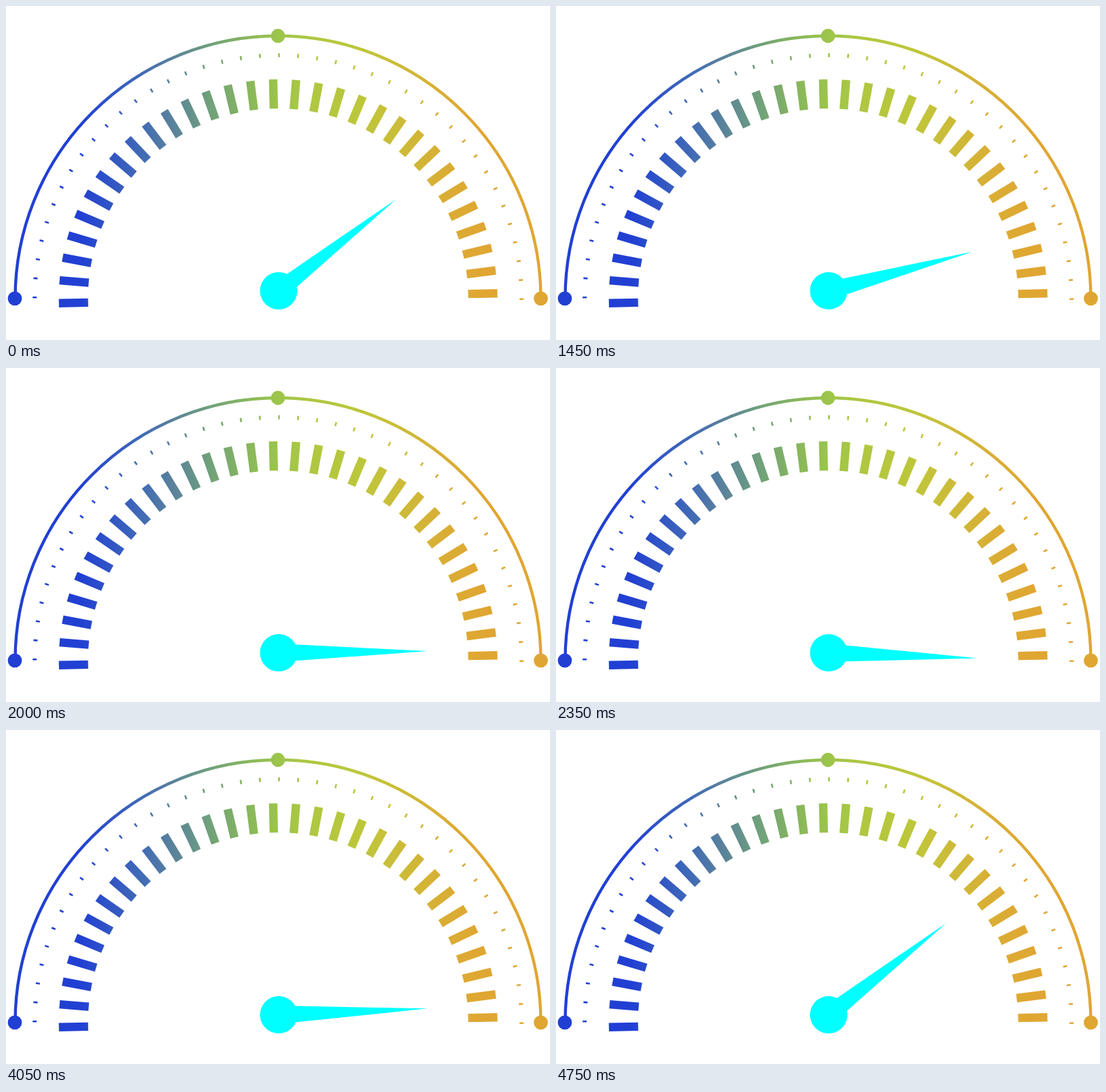
These frames come from a looping animation (800 by 492 pixels, 4800 ms). An HTML page:

```html
<!DOCTYPE html>
<html lang="en">
<head>
<meta charset="utf-8">
<title>Gauge</title>
<style>
  html, body { margin: 0; width: 100%; height: 100%; overflow: hidden; background: #fff; }
  svg { display: block; width: 100%; height: 100%; }
</style>
</head>
<body>
<svg viewBox="0 0 800 492">
  <defs>
    <linearGradient id="scale" gradientUnits="userSpaceOnUse" x1="0" y1="0" x2="800" y2="0"></linearGradient>
  </defs>
  <g id="dial" fill="none" stroke="url(#scale)">
    <path d="M13.5 430.5A386.5 386.5 0 0 1 786.5 430.5" stroke-width="4.4"/>
  </g>
  <g fill="url(#scale)">
    <circle cx="13" cy="430.8" r="10.4"/>
    <circle cx="400" cy="44" r="10.4"/>
    <circle cx="786.5" cy="430.8" r="10.4"/>
  </g>
  <g id="needle" fill="#0ff">
    <circle r="27.5"/>
    <path d="M14 -12.6L219 0L14 12.6Z"/>
  </g>
</svg>
<script>
const LOOP = 4800, STEP = 50;
const CENTER = { x: 400.2, y: 430.5 };

const colors = [
  [110, '#2140d3'], [200, '#416bb5'], [240, '#577f9e'], [300, '#70a17a'],
  [360, '#8ab85a'], [400, '#9cc54b'], [450, '#afc741'], [520, '#bcc73a'],
  [550, '#c5c23a'], [600, '#d0b737'], [640, '#d9ae35'], [700, '#e0a632']
];

// Time since leaving the low position (ms) and needle angle (degrees)
const sweep = [
  [0, -38], [15, -37.8], [50, -35.2], [100, -30.7], [150, -25.7], [200, -20.7],
  [250, -16.3], [300, -12.7], [350, -10], [450, -7.2], [565, -5.2], [650, -3.3],
  [750, -1.5], [850, -0.2], [950, 0.8], [1050, 1.5], [1150, 2], [1165, 2.1]
];

const dial = document.getElementById('dial');
const needle = document.getElementById('needle');

function add(parent, tag, attrs) {
  const node = document.createElementNS('http://www.w3.org/2000/svg', tag);
  for (const key in attrs) node.setAttribute(key, attrs[key]);
  parent.append(node);
}

function addTicks(count, start, gap, inner, outer, width) {
  for (let i = 0; i < count; i++) {
    const a = (180 + start + i * gap) * Math.PI / 180;
    const c = Math.cos(a), s = Math.sin(a);
    add(dial, 'path', {
      d: `M${CENTER.x + inner * c} ${CENTER.y + inner * s}L${CENTER.x + outer * c} ${CENTER.y + outer * s}`,
      'stroke-width': width
    });
  }
}

function angleAt(s) {
  const i = sweep.findIndex(([time]) => time >= s);
  if (i === 0) return sweep[0][1];
  if (i < 0) return sweep[sweep.length - 1][1];
  const [t0, a0] = sweep[i - 1], [t1, a1] = sweep[i];
  return a0 + (a1 - a0) * (s - t0) / (t1 - t0);
}

function draw(now) {
  const t = Math.floor((now % LOOP) / STEP) * STEP;
  const s = t < 3000 ? t - 1185 : 4750 - t;
  needle.setAttribute('transform', `translate(401 419.5) rotate(${angleAt(Math.max(0, s))})`);
}

for (const [x, color] of colors) {
  add(document.getElementById('scale'), 'stop', { offset: x / 800, 'stop-color': color });
}
addTicks(31, -1.3, 6, 279.5, 322.5, 12.4);
addTicks(41, 0.2, 4.5, 355, 361, 2.6);

let begin;
function frame(now) {
  begin ??= now;
  draw(now - begin);
  requestAnimationFrame(frame);
}
draw(0);
requestAnimationFrame(frame);
</script>
</body>
</html>
```
